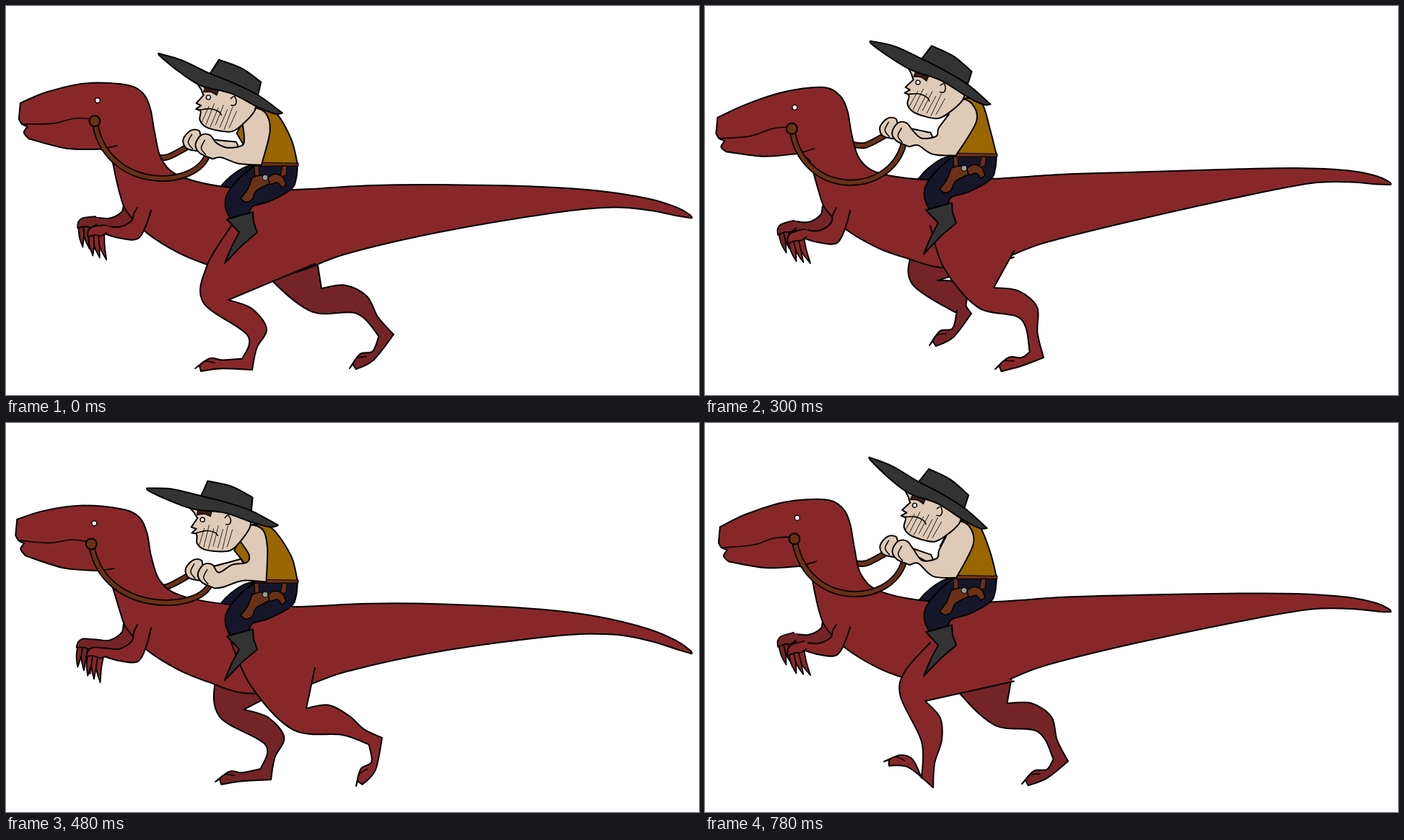
Recreate the animation shown at these times as an HTML page with a canvas. Size 960x540 px, loop 840 ms.

```html
<!DOCTYPE html>
<html lang="en">
<head>
<meta charset="utf-8">
<title>Raptor rider</title>
<style>
html, body { margin: 0; width: 960px; height: 540px; overflow: hidden; background: #fff }
canvas { display: block }
</style>
</head>
<body>
<canvas id="stage" width="960" height="540"></canvas>
<script>
const ctx = document.getElementById('stage').getContext('2d');
const RED = '#882729', DARK_RED = '#742426', SKIN = '#dfcab7', VEST = '#996600',
  FELT = '#333', DENIM = '#16162b', LEATHER = '#6b3018';

// Shapes are lists of smooth runs; neighbouring runs meet in a corner.
const parse = text => text.split('/').map(run => run.split(' ').map(p => p.split(',').map(Number)));
const around = ([x, y], text) => parse(text)[0].map(([dx, dy]) => [x + dx, y + dy]);
const clamp = v => Math.min(1, Math.max(0, v));
const mix = (a, b, k) => a + (b - a) * k;

function curve(runs) {
  const path = new Path2D();
  let last;
  for (const run of runs) {
    const p = last ? [last, ...run] : run;
    if (!last) path.moveTo(...p[0]);
    for (let i = 0; i < p.length - 1; i++) {
      const a = p[i - 1] || p[i], b = p[i], c = p[i + 1], d = p[i + 2] || c;
      path.bezierCurveTo(b[0] + (c[0] - a[0]) / 6, b[1] + (c[1] - a[1]) / 6,
        c[0] - (d[0] - b[0]) / 6, c[1] - (d[1] - b[1]) / 6, c[0], c[1]);
    }
    last = p[p.length - 1];
  }
  return path;
}
function paint(shape, fill, width = 2) {
  const path = shape instanceof Path2D ? shape : curve(typeof shape === 'string' ? parse(shape) : shape);
  if (fill) { ctx.fillStyle = fill; ctx.fill(path); }
  ctx.strokeStyle = '#000';
  ctx.lineWidth = width;
  ctx.stroke(path);
}
function strap(path) {
  paint(path, null, 9);
  ctx.lineWidth = 5.5;
  ctx.strokeStyle = LEATHER;
  ctx.stroke(path);
}
function dot([x, y], r, fill, width) {
  const path = new Path2D();
  path.arc(x, y, r, 0, 7);
  paint(path, fill, width);
}
function at([x, y], degrees, draw) {
  ctx.save();
  ctx.translate(x, y);
  ctx.rotate(degrees * Math.PI / 180);
  draw();
  ctx.restore();
}

// The body sways once per step, seven drawings long.
let beat = 0;
const wave = peak => Math.cos((beat - peak) / 7 * 2 * Math.PI);

// Head nods, back bobs, and the bob travels down the tail, growing.
function flex([x, y]) {
  const head = x < 260 ? clamp((250 - y) / 60) : 0;
  const tail = Math.max(0, (x - 400) / 550);
  const nod = 13 * head * wave(4.1 - 1.4 * clamp((x - 15) / 145));
  const bob = (10 * clamp((x - 100) / 300) * (1 - head) + 28 * tail ** 3) * wave(.5 + tail);
  return [x + 6 * head * wave(6.3), y + nod + bob];
}
const flexed = text => parse(text).map(run => run.map(flex));

const BODY = '15,146 52,132 105,120 160,119 184,130 195,152 201,185 213,217 242,236 313,246 400,246 500,241 600,240 740,242 820,247 890,258 930,271 948,282 950,286' +
  '/933,283 890,274 840,270 760,278 600,306 470,336 400,361 330,368 280,354 240,339 195,312 167,283 158,260 151,238 143,217 128,207' +
  '/80,207 27,195/20,187 25,179/17,175 13,168/15,146';

// Drawing number, then x,y of the knee crease, hock, heel and toe.
const GAIT = [
  [0, 308, 408, 361, 448, 341, 505, 262, 503],
  [3, 373, 392, 434, 428, 419, 490, 346, 503],
  [5, 400, 391, 460, 418, 469, 488, 402, 504],
  [7, 437, 397, 500, 408, 537, 461, 476, 508],
  [8, 416, 396, 476, 407, 521, 437, 485, 504],
  [10, 388, 384, 438, 389, 425, 440, 440, 466],
  [12, 322, 386, 362, 408, 369, 432, 311, 476],
  [13, 305, 386, 328, 440, 316, 506, 248, 470],
];
function joints(step) {
  const next = GAIT.findIndex(key => key[0] > step);
  const a = GAIT.at(next < 0 ? -1 : next - 1), b = next < 0 ? GAIT[0] : GAIT[next];
  const k = (step - a[0]) / ((b[0] || 14) - a[0]);
  const v = a.map((n, i) => mix(n, b[i], k));
  return [1, 3, 5, 7].map(i => [v[i], v[i + 1]]);
}

const unit = ([ax, ay], [bx, by], squash = 1) => {
  const x = bx - ax, y = (by - ay) * squash, length = Math.hypot(x, y) || 1;
  return [x / length, y / length];
};
// From p: go "along" in direction d and "left" square to it.
const go = (p, d, along, left) => [p[0] + d[0] * along - d[1] * left, p[1] + d[1] * along + d[0] * left];
const middle = (a, b) => [(a[0] + b[0]) / 2, (a[1] + b[1]) / 2];

function leg(step, fill) {
  const [crease, hock, heel, toe] = joints(step);
  const hip = [312, 305], rump = [428, 340 + 20 * clamp((370 - crease[0]) / 70)];
  const knee = go(crease, unit([350, 330], hock), 0, 35);
  const thigh = middle(hip, knee);
  const shank = unit(hock, heel), foot = unit(toe, heel, .45);
  const onFoot = (along, up) => go(toe, foot, along, -up);
  paint([
    [hip, [thigh[0] - 14, thigh[1] + 2], knee, go(hock, unit(crease, heel), 0, 28), go(heel, shank, -10, 18)],
    [onFoot(38, 12), onFoot(20, 14), toe],
    [onFoot(6, 4)], [onFoot(8, -4)],
    [onFoot(35, 0), heel],
    [go(middle(heel, hock), shank, 0, 4), hock, go(middle(crease, hock), unit(crease, hock), 0, -10), crease],
    [rump],
  ], fill);
  paint([[onFoot(6, 4), onFoot(14, 10), onFoot(27, 8)]], null, 1.6);
}

function foreleg(fill) {
  const swing = 11 * wave(2.9);
  const arm = parse('201,285 195,309 187,328 177,334 154,331 135,325/135,314 157,315 174,304 177,291 182,280');
  paint(arm.map(run => run.map(([x, y]) => [x, y + swing * clamp((y - 280) / 40)])), fill);
  at([135, 320 + swing], 14 * wave(2) - 4, () => {
    for (let i = 2; i >= 0; i--) {
      const x = -3 - 7 * i, y = 3 - 2 * i;
      paint([[[x + 4, y], [x + 2, y + 18], [x + 2 - 2 * i, 42 - 4 * i]],
        [[x - 5, y + 20], [x - 4, y]]], fill, 1.7);
    }
    paint('4,5 -4,8 -13,6 -23,7/-21,-1 -14,-6 4,-6', fill, 1.7);
    ctx.fillStyle = fill;
    ctx.fillRect(-4, -4, 12, 8);
  });
}

function seat() {
  paint('404,204 402,225 395,240 365,257 342,264 336,275/310,280/304,265 306,248 322,226 348,204', DENIM);
  paint('306,282/342,272/343,286/348,300/328,317/303,343/313,319/323,300/306,282', FELT);
}
function gear() {
  paint('346,203/405,204/405,208/346,208/346,203', LEATHER, 1);
  paint('344,208/350,208/351,222/345,223/344,208', LEATHER, 1);
  paint('383,208/389,208/388,221/380,223/383,208', LEATHER, 1);
  paint('341,224 355,221 368,231/347,242 341,254 332,258 325,253/335,240 341,224', LEATHER, 1.5);
  paint('363,224 372,219 383,223 388,234/382,238/376,231 366,233 363,224', LEATHER, 1.5);
  dot([359, 224], 4, '#999', 1);
}
function head(lift) {
  paint('66,-8/-12,-18 -11,-8 -7,-2/-15,11/-8,13/-14,19/-7,21 -6,33 4,41 22,43 40,41 52,30 66,8 66,-8', SKIN);
  for (let i = 0; i < 7; i++) {
    const x = 3 + i * 6.5;
    paint([[[x, 12 - i % 2 * 5], [x - 6, 36 + i % 3 * 2]]], null, .8);
  }
  paint('-8,19 6,15 18,17 22,21', null, 1.6);
  paint('-7,-13 3,-15 12,-12/11,-5/2,-8 -8,-6/-7,-13', '#3a1a14', 1.2);
  dot([0, 0], 3, '#fff', 1.4);
  paint('31,-4 35,-8 39,-2 38,4 33,5', null, 1.5);
  paint('-4,-32/5,-54/38,-48 68,-34/67,-13/-4,-32', FELT);
  const bend = lift * .45;
  paint(`-79,${-25 - lift} -45,${-34 - bend} -4,-33 30,-26 68,-15 105,3/95,6 70,1 30,-11 -12,-14 -45,${-17 - bend} -75,${-21 - lift} -79,${-25 - lift}`, FELT);
}

function draw(now) {
  const step = Math.floor(now / 60) % 14;
  beat = step % 7;
  const bob = 8.5 * wave(.5), pull = wave(1.9);
  const shoulder = [350 + 7 * wave(4.7), 151 + bob];
  const elbow = [355 + 8 * pull, 213 + bob];
  const hand = [279 + 4 * pull, 199 + 21 * pull], farHand = [hand[0] - 18, hand[1] - 8];
  const ring = flex([118, 172]), sag = ring[1] + 96, saddle = [0, 6.5 + bob];
  ctx.clearRect(0, 0, 960, 540);

  strap(curve([[[200, farHand[1] + 20], [222, farHand[1] + 22], [250, farHand[1] + 8]]]));
  at([0, -5], 0, () => leg((step + 7) % 14, DARK_RED));
  at([-14, -12], 0, () => foreleg(DARK_RED));
  at(saddle, 0, () => paint('345,206 328,211 306,227 290,246/335,250', DENIM));
  paint(flexed(BODY), RED);
  paint(flexed('17,175 60,176 90,169 112,169'), null, 1.6);
  paint(flexed('128,207 150,202'), null, 1.6);
  dot(flex([122, 143]), 3.5, '#fff', 1.4);
  foreleg(RED);
  leg(step, RED);

  at(saddle, 0, seat);
  paint([
    [...around(farHand, '3,13 -11,9 -15,-3 -5,-15 7,-15 14,-5'), ...around(elbow, '-35,-32')],
    [...around(elbow, '-32,-18'), ...around(farHand, '28,9 3,13')],
  ], SKIN);
  paint([
    [...around(shoulder, '-10,-15 3,-18 26,-12'), [395, 177 + bob], [404, 213 + bob]],
    [[350, 214 + bob]],
    [[331, 188 + bob], ...around(shoulder, '-27,18')],
    around(shoulder, '-10,-15'),
  ], VEST);
  at(saddle, 0, gear);

  const rein = new Path2D();
  rein.moveTo(...ring);
  rein.bezierCurveTo(ring[0] + 14, sag, hand[0] - 20, sag, hand[0], hand[1] + 12);
  strap(rein);
  dot(ring, 7.5, LEATHER);
  paint([
    [...around(shoulder, '-19,5 -20,-8 -5,-17 13,-10 19,15'), elbow],
    [...around(elbow, '-32,-2'), ...around(hand, '20,14 8,16')],
    [...around(hand, '-10,8 -16,-4 -8,-17 4,-17 13,-6'), ...around(elbow, '-47,-24 -27,-27 -24,-38'),
      ...around(shoulder, '-19,5')],
  ], SKIN);
  for (const [x, y] of [hand, farHand]) paint([[[x - 2, y + 10], [x - 8, y + 1], [x - 3, y - 10]]], null, 1.5);
  at([283 + 12 * wave(5), 120 + 14.5 * wave(1.2)], 7.5 + 9 * wave(5.6), () => head(11.5 + 12 * wave(6.6)));
}

ctx.lineJoin = ctx.lineCap = 'round';
function tick() {
  draw(performance.now());
  requestAnimationFrame(tick);
}
tick();
</script>
</body>
</html>
```
